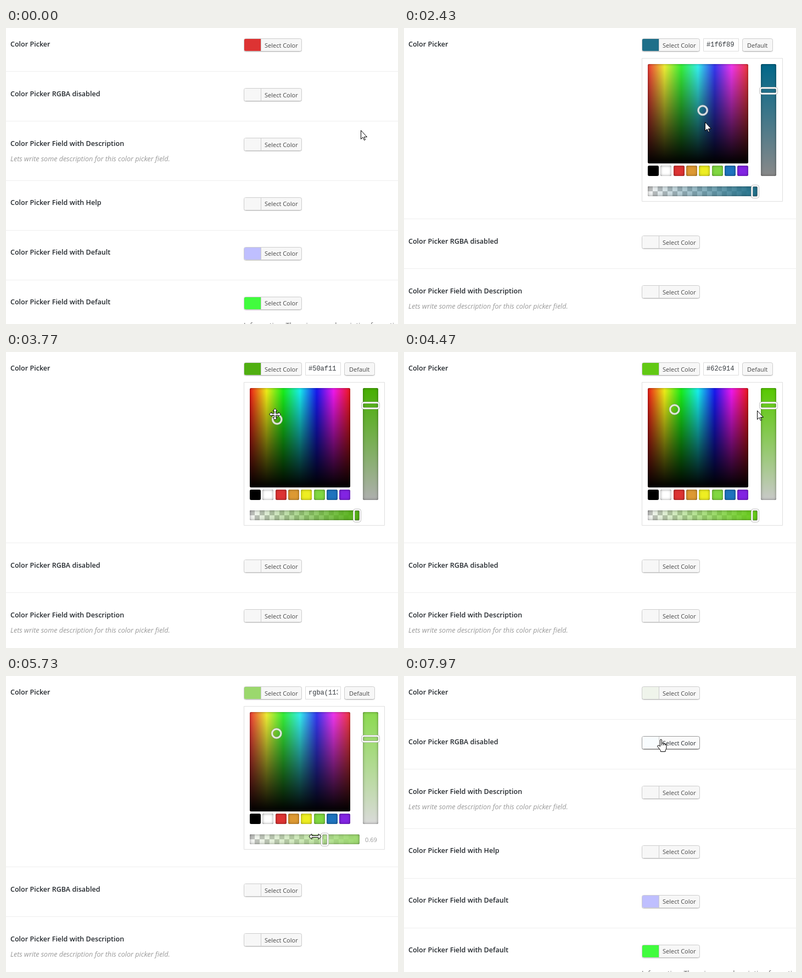
An HTML page with a canvas for the animation above (8 s loop, 714 px wide and 542 px high).

```html
<!DOCTYPE html>
<html lang="en">
<head>
<meta charset="utf-8">
<title>Color picker field</title>
<style>
html, body { margin: 0; width: 714px; height: 542px; overflow: hidden; background: #fff; }
canvas { display: block; }
</style>
</head>
<body>
<canvas id="stage" width="714" height="542"></canvas>
<script>
const ctx = document.getElementById('stage').getContext('2d');
const LOOP = 8000, OPEN = 1420, CLOSE = 7470;
const PITCH = 91, PANEL = 270, NOTE = 17.5;
const SANS = '"Open Sans", "Noto Sans", sans-serif';
const MONO = '"Liberation Mono", monospace';

// The gestures: start, end, pointer goal, then pointer kind and the values dragged to
const rest = { x: 646, y: 187, h: 0, s: 77, v: 87, a: 1 };
const moves = [
  [30, 130, 652, 162],
  [870, 1080, 520, 5],
  [1080, 1250, 497, 33],
  [1450, 1620, 495, 56],
  [1700, 1900, 446, 90],
  [1900, 2320, 545, 151, 'move', { h: 195, v: 54 }],
  [2320, 2420, 548, 172],
  [2530, 2800, 664, 116],
  [2800, 3200, 664, 99, 'ns', { s: 90 }],
  [3370, 3480, 545, 150],
  [3480, 3765, 490, 114, 'move', { h: 96, v: 69 }],
  [3800, 4050, 489, 98, 'move', { h: 94, v: 79 }],
  [4200, 4460, 643, 107],
  [4500, 4700, 664, 99],
  [4700, 4960, 664, 116, 'ns', { s: 77 }],
  [5030, 5350, 639, 294],
  [5350, 5720, 563, 294, 'ew', { a: 0.69 }],
  [5760, 6250, 448, 294, 'ew', { a: 0.06 }],
  [6250, 6570, 612, 293],
  [6970, 7120, 500, 98],
  [7120, 7270, 342, 173],
  [7670, 7950, 468, 117]
];

const rows = [
  { label: 'Color Picker' },
  { label: 'Color Picker RGBA disabled' },
  { label: 'Color Picker Field with Description',
    note: 'Lets write some description for this color picker field.' },
  { label: 'Color Picker Field with Help' },
  { label: 'Color Picker Field with Default', fill: '#bfbfff' },
  { label: 'Color Picker Field with Default', fill: '#41fc3e' }
];
const palette = ['#000', '#fff', '#dd3333', '#dd9933', '#eeee22', '#81d742', '#1e73be', '#8224e3'];

const doubleArrow = new Path2D('M-11 0L-6-5V-1.5H6V-5L11 0L6 5V1.5H-6V5Z');
const pointers = {
  arrow: new Path2D('M.5 .5V16.5L4 13L6.5 18.5L8.500 17.500L6.300 12.500H11.500Z'),
  hand: new Path2D('M-1.5 10V1Q-1.5-1 0-1T1.5 1V6Q4 5 4.5 7Q7 6 7.5 8Q10 7.5 10 10V14' +
    'Q10 17 8 19V21.5H-.5V19.5L-6 12.5Q-7 10.5-5 10Q-3 10-1.5 12ZM1.5 6V10M4.5 7V10M7.5 8V10'),
  move: new Path2D('M-10.5 0L-6-4V-1.5H-1.5V-6H-4L0-10.5L4-6H1.5V-1.5H6V-4' +
    'L10.5 0L6 4V1.5H1.5V6H4L0 10.5L-4 6H-1.5V1.5H-6V4Z'),
  ew: doubleArrow,
  ns: doubleArrow
};

const ease = p => p * p * (3 - 2 * p);

function pose(t) {
  const now = { ...rest, kind: 'arrow' };
  for (const [start, end, x, y, kind = 'arrow', values] of moves) {
    if (t < start) break;
    const p = ease(Math.min(1, (t - start) / (end - start)));
    const goal = { x, y, ...values };
    for (const k in goal) now[k] += (goal[k] - now[k]) * p;
    now.kind = kind;
  }
  for (const k of ['x', 'y', 'h', 's', 'v']) now[k] = Math.round(now[k]);
  now.a = Math.round(now.a * 100) / 100;
  return now;
}

function hsv(h, s, v) {
  const part = n => {
    const k = (n + h / 60) % 6;
    const c = v / 100 * (1 - s / 100 * Math.max(0, Math.min(k, 4 - k, 1)));
    return Math.floor(c * 255 + 1e-6);
  };
  return [part(5), part(3), part(1)];
}
const rgba = (c, a = 1) => `rgba(${c}, ${a})`;
const hex = c => '#' + c.map(n => n.toString(16).padStart(2, '0')).join('');
const onWhite = (c, a) => c.map(n => Math.round(255 + (n - 255) * a));

function text(s, x, y, font, color) {
  ctx.font = font;
  ctx.fillStyle = color;
  ctx.fillText(s, x, y);
}

function box(x, y, w, h, r, fill, stroke, width = 1) {
  ctx.beginPath();
  ctx.roundRect(x, y, w, h, r);
  if (fill) { ctx.fillStyle = fill; ctx.fill(); }
  if (stroke) { ctx.strokeStyle = stroke; ctx.lineWidth = width; ctx.stroke(); }
}

function circle(x, y, r, width, color) {
  ctx.beginPath();
  ctx.arc(x, y, r, 0, Math.PI * 2);
  ctx.lineWidth = width;
  ctx.strokeStyle = color;
  ctx.stroke();
}

function gradient(x0, y0, x1, y1, colors) {
  const g = ctx.createLinearGradient(x0, y0, x1, y1);
  colors.forEach((c, i) => g.addColorStop(i / (colors.length - 1), c));
  return g;
}

// Rounded area with a soft inner shadow
function well(x, y, w, h, ...fills) {
  ctx.save();
  ctx.beginPath();
  ctx.roundRect(x, y, w, h, 3);
  ctx.clip();
  for (const f of fills) {
    ctx.fillStyle = f;
    ctx.fillRect(x, y, w, h);
  }
  ctx.shadowColor = 'rgba(0,0,0,.4)';
  ctx.shadowBlur = 5;
  ctx.fillStyle = '#000';
  ctx.beginPath();
  ctx.rect(x - 20, y - 20, w + 40, h + 40);
  ctx.roundRect(x, y, w, h, 3);
  ctx.fill('evenodd');
  ctx.restore();
}

function button(x, y, w, label, tx, state) {
  const edge = { hover: '#999', focus: '#5b9dd9' }[state] || '#ccc';
  const top = Math.round(y);
  ctx.save();
  if (state === 'focus') {
    ctx.shadowColor = 'rgba(0,115,170,.8)';
    ctx.shadowBlur = 3;
  } else {
    box(x + 0.5, top + 1.5, w - 1, 23, 3, null, edge);
  }
  box(x + 0.5, top + 0.5, w - 1, 23, 3, state === 'hover' ? '#fafafa' : '#f7f7f7', edge);
  ctx.restore();
  text(label, tx, Math.floor(y) + 17, '11px ' + SANS, state ? '#23282d' : '#484848');
}

function colorButton(y, fill, state) {
  const top = Math.round(y) + 1;
  button(433, y, 106, 'Select Color', 471, state);
  box(434, top, 30, 22, [2, 0, 0, 2], fill);
  ctx.fillStyle = '#ccc';
  ctx.fillRect(464, top, 1, 22);
}

function handle(cx, cy, w, h) {
  const x = cx - w / 2, y = cy - h / 2;
  box(x + 0.5, y + 0.5, w - 1, h - 1, 4, null, '#aaa');
  box(x + 2, y + 2, w - 4, h - 4, 3, null, '#fff', 2.5);
  box(x + 3.5, y + 3.5, w - 7, h - 7, 1, null, 'rgba(120,120,120,.5)');
}

function picker({ h, s, v, a }) {
  const color = hsv(h, s, v);
  box(545.5, 19.5, 64, 23, 0, '#fff', '#ddd');
  ctx.save();
  ctx.beginPath();
  ctx.rect(550, 20, 54.5, 22);
  ctx.clip();
  const value = a < 1 ? `rgba(${color},${a.toFixed(2)})` : hex(color);
  text(value, 551, 34, '12px ' + MONO, '#32373c');
  ctx.restore();
  button(616, 19, 56, 'Default', 625);

  box(433.5, 55.5, 256, 262, 0, '#fff', '#dfdfdf');
  const hues = Array.from({ length: 7 }, (_, i) => rgba(hsv(i * 60, s, 95)));
  well(444, 66, 183, 182, gradient(444, 0, 627, 0, hues),
    gradient(0, 66, 0, 248, ['rgba(0,0,0,0)', '#000']));
  const shades = [100, 0].map(n => rgba(onWhite(hsv(h, n, v), a)));
  well(650, 66, 28, 205, gradient(0, 66, 0, 271, shades));
  palette.forEach((c, i) => well(444 + Math.round(i * 23.3), 252, 20, 19, c));

  const tint = onWhite(color, a);
  box(444, 290, 200, 18, 3, '#f5f5f5');
  ctx.fillStyle = '#bebebe';
  for (let i = 0; i < 22; i++) ctx.fillRect(444 + i * 9, 290 + i % 2 * 9, 9, 9);
  well(444, 290, 200, 18, gradient(444, 0, 644, 0, [rgba(tint, 0), rgba(tint)]));

  handle(664, Math.round(115 - (s - 77) * 1.3), 34, 14);
  handle(Math.round(449 + 190 * a) + 0.5, 299.5, 15, 25);
  if (a < 1) text(a.toFixed(2), 654, 304, '11px ' + SANS, '#999');

  const x = 445 + h / 360 * 183, y = 67 + (100 - v) * 1.82;
  circle(x, y, 9.8, 1, 'rgba(150,150,150,.8)');
  circle(x, y, 8, 3, 'rgba(245,245,245,.88)');
  circle(x, y, 6.4, 1, 'rgba(150,150,150,.5)');
}

function pointer(x, y, kind) {
  ctx.save();
  ctx.translate(x, y);
  if (kind === 'ns') ctx.rotate(Math.PI / 2);
  ctx.lineJoin = 'round';
  ctx.lineWidth = 1;
  ctx.fillStyle = '#fff';
  ctx.strokeStyle = '#000';
  ctx.fill(pointers[kind]);
  ctx.stroke(pointers[kind]);
  ctx.restore();
}

function draw(t) {
  const now = pose(t);
  const open = t >= OPEN && t < CLOSE;
  ctx.fillStyle = '#fff';
  ctx.fillRect(0, 0, 714, 542);

  let y = 19;
  rows.forEach(({ label, note, fill = '#f7f7f7' }, i) => {
    const over = now.x >= 433 && now.x < 539 && now.y >= y && now.y < y + 25;
    let state = over ? 'hover' : '';
    if (over) now.kind = 'hand';
    if (i === 0) {
      fill = rgba(hsv(now.h, now.s, now.v), now.a);
      if (t >= OPEN && t < 1900) state = 'focus';
    } else if (over) {
      fill = '#f8fcfe';
    }
    text(label, 8, Math.floor(y) + 15, '600 12.55px ' + SANS, '#23282d');
    if (note) text(note, 8, y + 43, 'italic 12.6px ' + SANS, '#999');
    colorButton(y, fill, state);

    y += PITCH + (note ? NOTE : 0) + (open && i === 0 ? PANEL : 0);
    ctx.fillStyle = '#eee';
    ctx.fillRect(0, Math.round(y) - 31, 714, 1);
  });
  // Help line under the last button
  ctx.fillStyle = '#fff';
  ctx.fillRect(0, Math.round(y) - 31, 714, 1);
  text('Information: There is some description for option.', 433, Math.floor(y) - 33,
    '12.6px ' + SANS, '#666');

  if (open) picker(now);
  pointer(now.x, now.y, now.kind);
}

const start = performance.now();
function frame(now) {
  draw(Math.max(0, now - start) % LOOP);
  requestAnimationFrame(frame);
}
draw(0);
requestAnimationFrame(frame);
</script>
</body>
</html>
```
